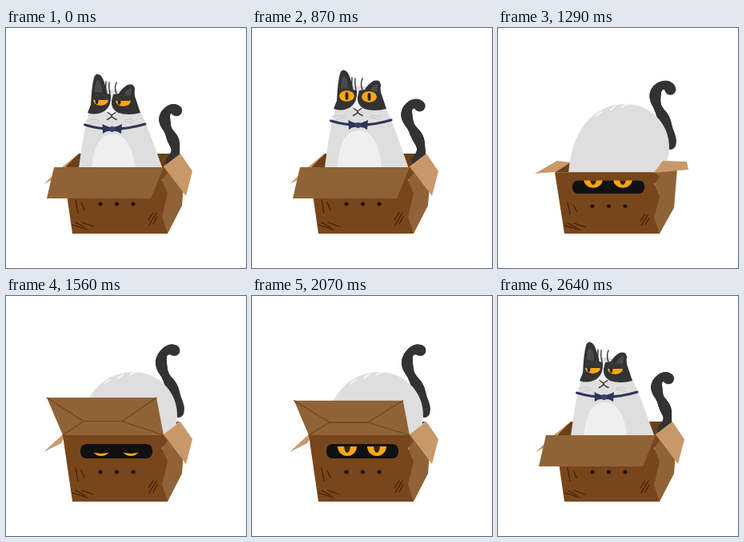
Animation, 300 px wide and 300 px high, one loop 2.67 s. Source, as an HTML page with a canvas:

```html
<!DOCTYPE html>
<html>
<head>
<meta charset="utf-8">
<style>
  html, body { margin: 0; height: 100%; overflow: hidden; background: #fff; }
  canvas { display: block; width: 300px; height: 300px; }
</style>
</head>
<body>
<canvas id="stage" width="300" height="300"></canvas>
<script>
const c = document.getElementById('stage').getContext('2d');
const LOOP = 2670;
const DARK = '#333', ORANGE = '#fda512', NAVY = '#2f345a', LINE = '#43200a';
const FRONT = '#78461b', SIDE = '#8f6337', INSIDE = '#6b3f18', TAN = '#c9986a';

const mix = (a, b, k) => Array.isArray(a) ? a.map((v, i) => mix(v, b[i], k)) : a + (b - a) * k;

// Eased value at time t from alternating time, value arguments
function key(t, ...k) {
  if (t <= k[0]) return k[1];
  for (let i = 2; i < k.length; i += 2) {
    if (t <= k[i]) {
      const p = (t - k[i - 2]) / (k[i] - k[i - 2]);
      return mix(k[i - 1], k[i + 1], p * p * (3 - 2 * p));
    }
  }
  return k[k.length - 1];
}

function fill(path, color) {
  c.fillStyle = color;
  c.fill(new Path2D(path));
}

function stroke(path, color, width) {
  c.strokeStyle = color;
  c.lineWidth = width;
  c.stroke(new Path2D(path));
}

const poly = (points, color) => fill('M' + points.join('L') + 'Z', color);

function ellipse(x, y, rx, ry, color) {
  c.beginPath();
  c.ellipse(x, y, rx, ry, 0, 0, 7);
  c.fillStyle = color;
  c.fill();
}

// Draws inside a clip without leaking state
function within(path, draw) {
  c.save();
  c.clip(path);
  draw();
  c.restore();
}

// Walks up from the root, turning left by lean and then over to the right by curl
function drawTail(t, turn) {
  const sway = key(t, 0, 0, 390, 1, 870, 1, 2400, 1, 2640, 0);
  const left = key(t, 390, 0, 870, 1, 1080, 1, 1250, 0);
  const over = key(t, 1320, 1, 1560, 0, 1820, .4, 2070, 0);
  let x = mix(205, 215, turn), y = mix(168, 147, turn);
  const length = mix(mix(81, 90, sway), 94, turn);
  const root = mix(1.8, 1, turn);
  const lean = mix(-.92 - .08 * left, -.82, turn);
  const curl = mix(3.2 + .2 * left, 2.8 + .8 * over, turn);
  const steps = 50;
  for (let i = 0; i <= steps; i++) {
    const s = i / steps;
    const angle = lean + root * (1 - s) ** 3 + curl * s ** 4;
    x += Math.sin(angle) * length / steps;
    y -= Math.cos(angle) * length / steps;
    const r = 6.2 + .9 * Math.sin(s * 19 + 1);
    ellipse(x, y, r, r, DARK);
  }
}

const SIT = [[88, 195], [97, 145], [98, 77], [134, 77], [163, 77], [172, 110], [203, 195]];
const HUMP = [[88, 190], [88, 140], [112, 95], [160, 95], [200, 95], [234, 140], [200, 190]];

function drawBody(turn, drop) {
  const shift = Math.min(drop, 20) * (1 - turn);
  const p = mix(SIT, HUMP, turn).map(([x, y], i) => [x, y + shift * Math.sin(Math.PI * i / 6)]);
  fill(`M${p[0]}C${p.slice(1, 4).join(' ')}C${p.slice(4).join(' ')}Z`, '#dedede');
  if (turn > .8) stroke('M123 110q3-4 7-5M140 103q4-4 7-5M155 99q5-4 10-4', '#f8f8f8', 1.6);
}

function headEye(x, y, lid, look) {
  const shape = new Path2D();
  shape.ellipse(x, y, 9.6, 7, 0, 0, 7);
  within(shape, () => {
    c.fillStyle = ORANGE;
    c.fill(shape);
    ellipse(x + look, y, 2, 5, '#262626');
    c.fillStyle = DARK;
    c.fillRect(x - 10, y - 8, 20, 8 * lid);
  });
}

function drawHead(t, drop) {
  c.save();
  c.translate(0, drop);
  fill('M106 195C107 155 113 133 134 133C155 133 161 160 164 195Z', '#efefef');
  fill('M131 82H134L141 107H123Z', '#f1f1f1');
  // ears and mask
  fill('M106 96Q107 73 110 62Q113 54 119 60Q124 67 126 82L131 83Q132 98 123 104Q112 110 102 106Z', DARK);
  fill('M134 83L141 82Q145 75 152 71Q160 69 161 76Q160 84 162 88L168 106Q153 110 140 106Q131 101 132 91Z', DARK);
  fill('M111 80Q111 66 115 65Q120 69 120 81ZM148 83Q152 75 157 75Q157 80 156 85Z', '#4a4a4a');
  stroke('M125 67Q124 75 126 83M129 68Q128 75 130 82M138 68Q135 75 138 82', DARK, 1.4);
  const lid = key(t, 540, 1, 720, 0, 2450, 0, 2580, 1);
  const look = key(t, 120, -5, 330, 5, 480, 5, 690, 0, 2450, 0, 2610, -5);
  headEye(118.5, 90, lid, look);
  headEye(146.5, 91, lid, look);
  stroke('M127 105.5L132 109L137 105.5M132 109V111M126.5 114.5Q130 113 132 110.5Q134 113 138 114.5', DARK, 1.4);
  stroke('M100 116Q108 113 116 115M103 121Q109 117 116 117M148 115Q155 113 161 116M149 117Q156 117 160 120', '#c9c9c9', 1);
  // collar and bow
  stroke('M98.5 121Q134 132 174 120', NAVY, 3);
  fill('M120.5 120Q127 124 132 124Q138 124 145 120L144 132Q138 128 132 129Q126 128 121 132Z', NAVY);
  ellipse(132.5, 126.5, 3.5, 3.4, '#3a4066');
  c.restore();
}

function slotEye(x, y, lid, sag) {
  ellipse(x, y, 12, 12, ORANGE);
  ellipse(x, y - 1, 4, 9, '#33291c');
  fill(`M${x - 14} 170H${x + 14}V${lid - sag}Q${x} ${lid + sag} ${x - 14} ${lid - sag}Z`, '#111');
}

function drawFront(t, squash) {
  c.save();
  c.translate(0, 257 * squash);
  c.scale(1, 1 - squash);
  poly([[197, 174], [224, 170], [220, 222], [202, 257], [190, 257]], SIDE);
  fill('M71 174H197L202 181L195 190L202 207L195 236L202 257H83Z', FRONT);
  for (const x of [118, 138.5, 159]) ellipse(x, 220, 2.5, 2.5, '#1c120a');
  stroke('M87 215L90 231M94 218L98 227M83 246L102 252M87 243L98 249M95 243L109 248' +
    'M179 246L188 231M184 245L189 236M178 240L184 231', LINE, 1.3);
  const slot = new Path2D();
  slot.roundRect(93, 185, 90, 18, 7);
  within(slot, () => {
    c.fillStyle = '#111';
    c.fill(slot);
    const lid = key(t, 1400, 170, 1530, 197, 1580, 197, 1720, 188);
    const sag = key(t, 1580, 3, 1720, 0);
    for (const x of [119, 156]) slotEye(x, 188 - 64 * squash, lid, sag);
  });
  c.restore();
}

// The front flap hangs down at -1, points forward at 0 and stands up at 1
function drawFlap(t, rim) {
  const k = key(t, 1100, -1, 1250, 0, 1320, 0, 1470, 1.08, 1560, 1, 1700, .92, 2190, .92, 2290, 0, 2400, -1);
  const up = k > 0, reach = Math.abs(k), base = 174 + rim;
  const far = base - k * (up ? 47 : 39);
  const bl = [71 - (up ? 0 : 11 * reach), base], br = [197, base];
  const tl = [71 - 20 * reach, far], tr = [197 - reach * (up ? 9 : 16), far];
  poly([bl, br, tr, tl], SIDE);
  if (k > .15) {
    const fold = mix(base, far, .37), a = [97, fold], b = [145, fold];
    stroke(`M${tl}L${a}L${b}L${tr}M${a}L${bl}M${b}L${br}`, '#704720', 1.3);
  }
}

function draw(t) {
  const drop = key(t, 0, 0, 330, 1.5, 540, 0, 870, -5, 1000, -12, 1080, 5, 1230, 130,
    2240, 130, 2400, -12, 2520, 1.5, 2640, 0);
  const turn = key(t, 1040, 0, 1230, 1, 2240, 1, 2380, 0);
  const open = key(t, 1080, 0, 1220, 1, 1310, 1, 1440, 0);
  const squash = .075 * open, rim = 83 * squash;

  c.fillStyle = '#fff';
  c.fillRect(0, 0, 300, 300);
  c.lineCap = c.lineJoin = 'round';

  poly([[71, 174 + rim], [91, 157 + 10 * open], [217, 157 + 10 * open], [197, 174 + rim]], INSIDE);
  poly(mix([[47, 195], [71, 173], [91, 157], [76, 172], [69, 184]],
    [[46, 182], [60, 174], [74, 166], [91, 168], [72, 180]], open), TAN);
  drawTail(t, turn);
  within(new Path2D('M0 0H300V200H0Z'), () => {
    drawBody(turn, drop);
    if (drop < 129) drawHead(t, drop);
  });
  drawFront(t, squash);
  poly(mix([[197, 173], [218, 157], [233, 179], [225, 210]],
    [[195, 181], [206, 166], [236, 167], [238, 177]], open), TAN);
  drawFlap(t, rim);
}

function tick() {
  draw(performance.now() % LOOP);
  requestAnimationFrame(tick);
}
tick();
</script>
</body>
</html>
```
